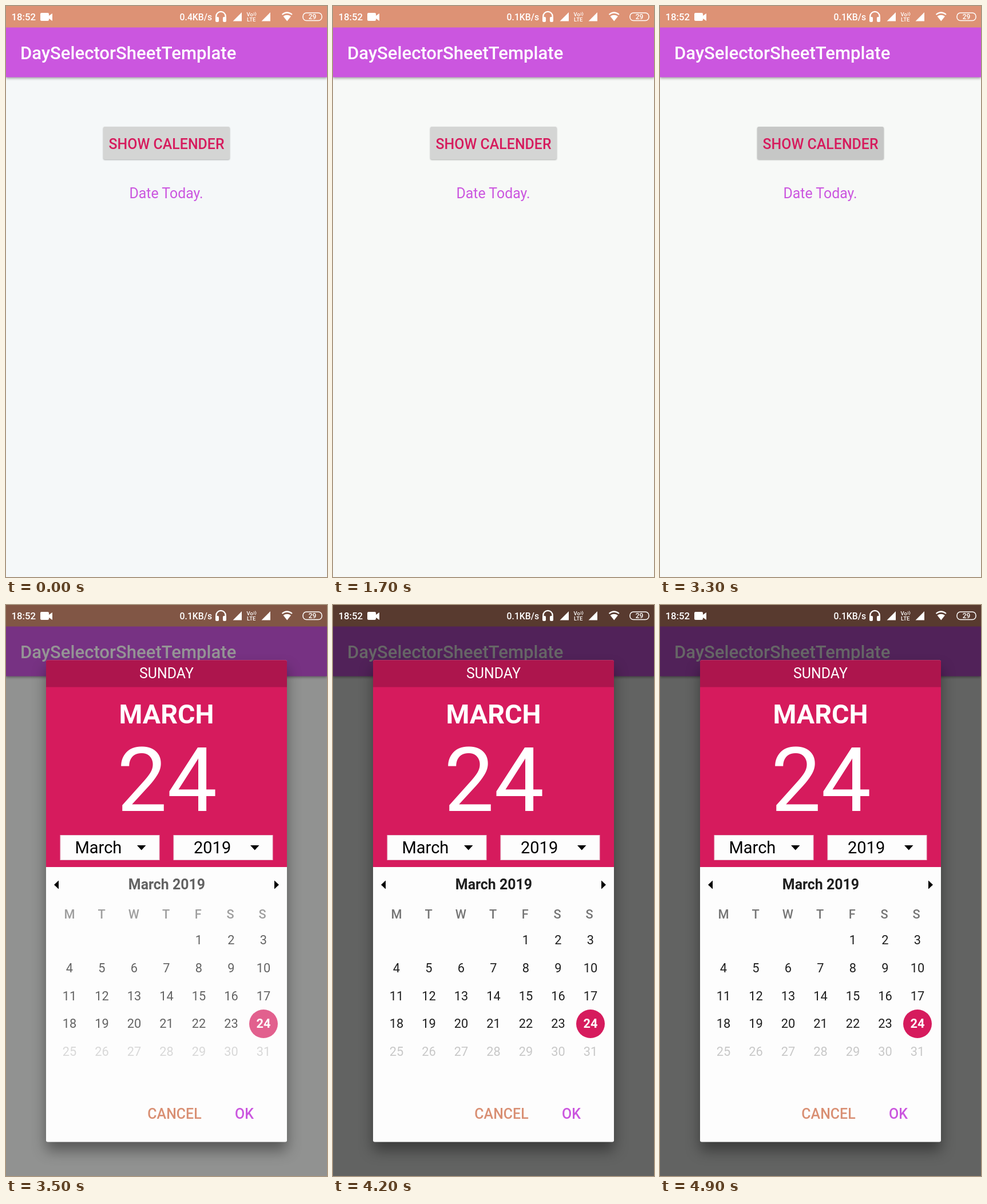
These frames come from a looping animation (561 by 998 pixels, 5 s). An HTML page:

```html
<!DOCTYPE html>
<html lang="en">
<head>
<meta charset="utf-8">
<style>
  html, body { margin: 0; width: 100%; height: 100%; overflow: hidden; }
  svg { display: block; width: 561px; height: 998px; font-family: Roboto, sans-serif; }
  .bar { filter: drop-shadow(0 2px 2px rgba(0, 0, 0, .35)); }
  .button { filter: drop-shadow(0 1.5px 1px rgba(0, 0, 0, .3)); }
  .card { filter: drop-shadow(0 15px 12px rgba(0, 0, 0, .4)); }
</style>
</head>
<body>
<svg id="stage" viewBox="0 0 561 998">
  <rect id="page" width="561" height="998"/>
  <rect class="bar" y="37" width="561" height="87.5" fill="#cb56df"/>
  <rect width="561" height="37.5" fill="#dd9275"/>
  <g id="screen">
    <rect id="button" class="button" x="170" y="211" width="221" height="57" rx="3"/>
  </g>
  <rect id="dim" width="561" height="998"/>

  <g id="status" fill="#fff">
    <path d="M62 12h11q2 0 2 2v3l6-4v13l-6-4v2q0 2-2 2h-11q-2 0-2-2v-10q0-2 2-2z"/>
    <path d="M367.3 22v-4a8.2 8.2 0 0 1 16.4 0v4" fill="none" stroke="#fff" stroke-width="2.3"/>
    <rect x="366" y="19" width="6" height="9" rx="2"/>
    <rect x="379" y="19" width="6" height="9" rx="2"/>
    <path d="M396.500 26.500L412 11v15.500zM446.500 26.500L462 11v15.500z"/>
    <path d="M433 11.500q2 2.500 0 5M435.500 10.500q3 3.500 0 7" fill="none" stroke="#fff"/>
    <path d="M482.500 15q8.500-7 17.500 0" fill="none" stroke="#fff" stroke-width="2.2"/>
    <path d="M484.500 18q6.500-4.500 13.500 0l-6.700 8.500z"/>
    <rect x="519" y="12" width="33" height="13.500" rx="6" fill="none" stroke="#fff" stroke-width="1.500"/>
  </g>

  <g id="dialog">
    <rect class="card" x="70" y="96.500" width="421" height="842" rx="3" fill="#fdfdfd"/>
    <path d="M70 458V99.500q0-3 3-3H488q3 0 3 3V458z" fill="#d61b5d"/>
    <path d="M70 143.500V99.500q0-3 3-3H488q3 0 3 3V143.500z" fill="#ad154d"/>
    <g fill="#fdfdfd" stroke="#e8c9d3">
      <rect x="95" y="402.500" width="173" height="43"/>
      <rect x="293" y="402.500" width="173" height="43"/>
    </g>
    <path d="M229 420h15.500l-7.750 8.500zM427 420h15.500l-7.750 8.500zM84 489l8-7.500v15zM477 489l-8-7.500v15z"/>
    <g id="calendar"><circle cx="450" cy="732" r="25" fill="#d61b5d"/></g>
  </g>
</svg>
<script>
const $ = id => document.getElementById(id);

function text(parent, content, x, y, size, fill, weight = 400, anchor = "middle") {
  const node = document.createElementNS("http://www.w3.org/2000/svg", "text");
  const attributes = { x, y, fill, "font-size": size, "font-weight": weight, "text-anchor": anchor };
  for (const name in attributes) node.setAttribute(name, attributes[name]);
  node.textContent = content;
  $(parent).append(node);
  return node;
}

const pink = "#d61b5d", purple = "#cb56df", white = "#fff";

text("screen", "DaySelectorSheetTemplate", 25, 93, 31.1, white, 500, "start");
text("screen", "SHOW CALENDER", 280.5, 249.5, 24.9, pink, 500);
text("screen", "Date Today.", 280, 335.5, 24.9, purple);

text("status", "18:52", 9.5, 25, 16.8, white, 500, "start");
const speed = text("status", "", 303.5, 24.5, 15.8, white, 500, "start");
text("status", "Vo", 420.5, 17.5, 9.5, white, 500, "start");
text("status", "LTE", 421, 26.5, 9.5, white, 500, "start");
text("status", "29", 535.5, 23, 12, white, 500);

text("dialog", "SUNDAY", 280.5, 128, 24.9, white);
text("dialog", "MARCH", 280.5, 207, 46.7, white, 700);
text("dialog", "24", 281.5, 360, 155.8, white);
text("dialog", "March", 120.5, 433.5, 29, "#000", 400, "start");
text("dialog", "2019", 328, 433.5, 29, "#000", 400, "start");
text("dialog", "CANCEL", 294.5, 897.5, 24.9, "#d98f73", 500);
text("dialog", "OK", 416.5, 897.5, 24.9, purple, 500);

text("calendar", "March 2019", 281, 497, 24.9, "#1f1f1f", 600);
[..."MTWTFSS"].forEach((letter, i) => text("calendar", letter, 111 + 56.2 * i, 548, 21.8, "#757575", 500));
for (let day = 1; day <= 31; day++) {
  const cell = day + 3, today = day === 24;
  text("calendar", day, 111 + 56.5 * (cell % 7), 593 + 48.8 * Math.floor(cell / 7), 21.8,
    today ? white : day > 24 ? "#c8c8c8" : "#1f1f1f", today ? 700 : 400);
}

const ramp = (t, start, end) => Math.min(1, Math.max(0, (t - start) / (end - start)));

function draw(now) {
  const t = Math.floor(now % 5000 / 100) * 100;
  const press = ramp(t, 3100, 3300), open = ramp(t, 3300, 3590);
  const grey = 212 - 14 * press;
  speed.textContent = t < 500 ? "0.4KB/s" : "0.1KB/s";
  $("page").setAttribute("fill", t < 500 ? "#f5f8f9" : "#f7f9f7");
  $("button").setAttribute("fill", `rgb(${grey},${grey + 1},${grey})`);
  $("dim").setAttribute("opacity", 0.6 * open);
  $("dialog").setAttribute("opacity", ramp(t, 3300, 3500));
  $("calendar").setAttribute("opacity", open);
  requestAnimationFrame(draw);
}
requestAnimationFrame(draw);
</script>
</body>
</html>
```
